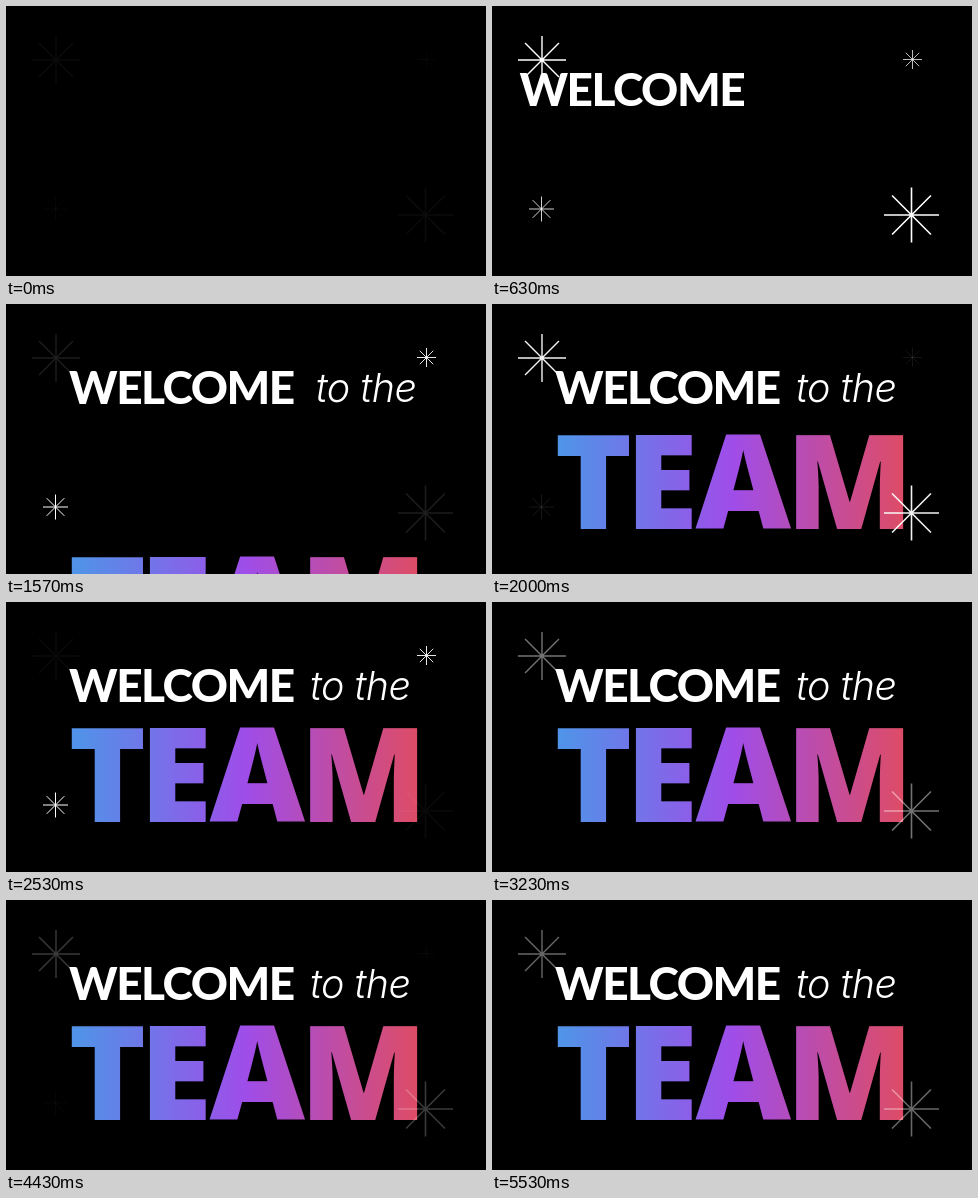
Write an HTML page with a canvas that moves like this. It is 480 px wide and 270 px high and loops after 5.56 s.

```html
<!DOCTYPE html>
<html lang="en">
<head>
<meta charset="utf-8">
<title>Welcome to the team</title>
<style>
html, body { margin: 0; width: 100%; height: 100%; overflow: hidden; background: #000; }
canvas { display: block; width: 480px; height: 270px; }
</style>
</head>
<body>
<canvas id="stage" width="480" height="270"></canvas>
<script>
const ctx = document.getElementById('stage').getContext('2d');
const LOOP = 5560, BLINK = 1145, SLIDE = 733;

const stars = [
  { x: 50, y: 54, r: 24, w: 1.4, big: true },
  { x: 420.5, y: 53.5, r: 9.5, w: 0.9, big: false },
  { x: 49.5, y: 203, r: 12.5, w: 1, big: false },
  { x: 419.5, y: 209, r: 27.5, w: 1.6, big: true }
];

const fill = ctx.createLinearGradient(70, 0, 411, 0);
fill.addColorStop(0, '#5093e8');
fill.addColorStop(0.5, '#9f4de9');
fill.addColorStop(1, '#dd4c66');

const clamp = v => Math.min(1, Math.max(0, v));

// Distance still to go, with a sine ease in and out.
const left = (t, start, dist) =>
  dist * (1 + Math.cos(Math.PI * clamp((t - start) / SLIDE))) / 2;

const wave = (t, peak) => (1 + Math.cos(2 * Math.PI * (t - peak) / BLINK)) / 2;

function glow(t, big) {
  if (big) return 0.04 + 0.96 * clamp(1.4 * wave(t, 735) ** 3.5);
  return clamp(1.4 * wave(t, 377.5)) * clamp(0.06 + t / 350);
}

// Places the word by the left edge of its ink.
function word(text, font, gap, x, y) {
  ctx.font = font;
  ctx.letterSpacing = gap + 'px';
  ctx.fillStyle = '#fff';
  ctx.fillText(text, x + ctx.measureText(text).actualBoundingBoxLeft, y);
}

// Places each letter by the middle of its ink.
function letters(text, font, middles, y) {
  ctx.font = font;
  ctx.letterSpacing = '0px';
  ctx.fillStyle = fill;
  [...text].forEach((c, i) => {
    const m = ctx.measureText(c);
    ctx.fillText(c, middles[i] + (m.actualBoundingBoxLeft - m.actualBoundingBoxRight) / 2, y);
  });
}

function star(s, alpha) {
  ctx.globalAlpha = alpha;
  ctx.strokeStyle = '#fff';
  ctx.lineWidth = s.w;
  ctx.beginPath();
  for (let i = 0; i < 4; i++) {
    const dx = s.r * Math.cos(i * Math.PI / 4), dy = s.r * Math.sin(i * Math.PI / 4);
    ctx.moveTo(s.x - dx, s.y - dy);
    ctx.lineTo(s.x + dx, s.y + dy);
  }
  ctx.stroke();
  ctx.globalAlpha = 1;
}

function draw(t) {
  ctx.fillStyle = '#000';
  ctx.fillRect(0, 0, 480, 270);
  word('WELCOME', '800 46px Lato, sans-serif', -1.5, 63 - left(t, 62, 300), 99.5);
  word('to the', 'italic 300 39.5px Inter, sans-serif', -0.5, 305 + left(t, 919, 195), 98);
  letters('TEAM', '800 131.6px "Open Sans", sans-serif', [101.6, 171.8, 251.5, 358],
    220 + left(t, 1350, 160));
  for (const s of stars) star(s, glow(t, s.big));
}

const begin = performance.now();
function tick() {
  draw((performance.now() - begin) % LOOP);
  requestAnimationFrame(tick);
}
tick();
</script>
</body>
</html>
```
